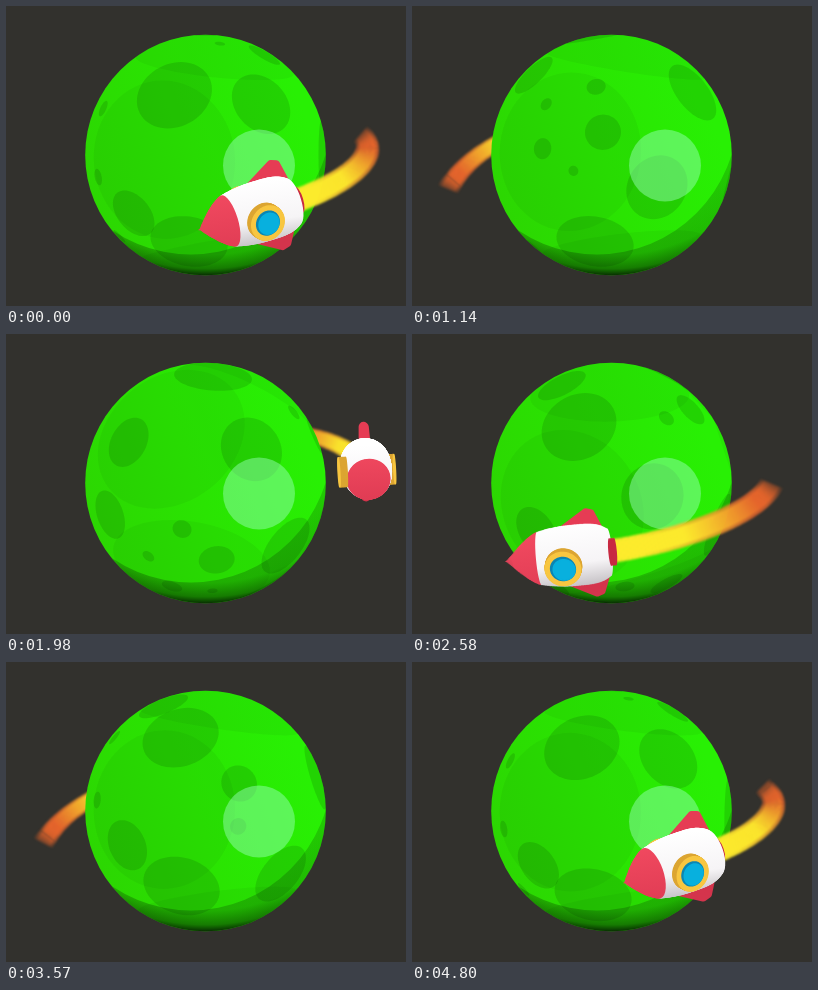
These frames come from a looping animation (400x300 px, 4830 ms). An HTML page with a canvas:

```html
<!DOCTYPE html>
<html>
<head>
<meta charset="utf-8">
<title>Rocket in orbit</title>
<style>
html, body { margin: 0; width: 100%; height: 100%; overflow: hidden; background: #32312d; }
canvas { display: block; width: 400px; height: 300px; }
</style>
</head>
<body>
<canvas id="stage" width="400" height="300"></canvas>
<script>
const LOOP = 4830, STEP = 30, ORBIT = LOOP / 2, TAU = Math.PI * 2, DEG = Math.PI / 180;
const { sin, cos, sqrt, abs, hypot, min, max, atan2 } = Math;
const ctx = document.getElementById('stage').getContext('2d');
const layer = document.createElement('canvas');
layer.width = 400;
layer.height = 300;
const trailCtx = layer.getContext('2d');

// ---------- planet ----------
const PX = 199.5, PY = 149, PR = 120.3;
// The spin axis points right and towards the viewer.
const AX = 0.8, AZ = 0.6;

// A belt of evenly spaced spots: height on the axis, longitude in degrees, radius.
const belt = (n, h, lon, gap, radius) =>
  Array.from({ length: n }, (_, i) => [h, lon + gap * i, radius]);

const plains = belt(4, 0.17, 3, 90, 0.72);
const craters = [
  ...belt(3, 0.265, -33, 85, 0.33),
  ...belt(3, -0.12, 30, 81, 0.22),
  ...belt(4, -0.47, -26, 38, 0.07),
  ...belt(2, 0.84, -54, 234, 0.28),
  // the scattered small ones
  [-0.335, -131, 0.21], [0.53, -98, 0.15], [0.785, 72, 0.155], [0.385, -123, 0.08],
  [0, -110, 0.055], [0.03, -88, 0.088], [0.31, -77, 0.043], [0.79, 106, 0.07]
];

function disc(x, y, r) {
  ctx.beginPath();
  ctx.arc(x, y, r, 0, TAU);
}

// A round patch on the sphere, pushed to the rim where it turns away.
function patch([h, lon, radius], turn) {
  const a = lon * DEG + turn, r = sqrt(1 - h * h);
  const x = AX * h - AZ * r * cos(a), y = r * sin(a), z = AZ * h + AX * r * cos(a);
  if (z < -sin(radius)) return;
  const m = hypot(x, z) || 1;
  const e = [z / m, 0, -x / m];
  const f = [y * e[2], z * e[0] - x * e[2], -y * e[0]];
  const k = cos(radius), s = sin(radius);
  ctx.beginPath();
  for (let i = 0; i < 64; i++) {
    const c = s * cos(i / 64 * TAU), d = s * sin(i / 64 * TAU);
    let qx = x * k + e[0] * c + f[0] * d;
    let qy = y * k + f[1] * d;
    const qz = z * k + e[2] * c + f[2] * d;
    if (qz < 0) {
      const n = hypot(qx, qy);
      qx /= n;
      qy /= n;
    }
    ctx.lineTo(PX + PR * qx, PY + PR * qy);
  }
  ctx.fill();
}

function drawPlanet(turn) {
  ctx.save();
  disc(PX, PY, PR);
  const base = ctx.createLinearGradient(80, 190, 300, 110);
  base.addColorStop(0, '#2cd602');
  base.addColorStop(0.5, '#2ae402');
  base.addColorStop(1, '#28f004');
  ctx.fillStyle = base;
  ctx.fill();
  ctx.clip();

  ctx.fillStyle = 'rgba(0,70,0,.06)';
  plains.forEach(p => patch(p, turn));
  ctx.fillStyle = 'rgba(0,50,0,.15)';
  craters.forEach(c => patch(c, turn));

  // shaded crescent along the bottom right
  ctx.beginPath();
  ctx.rect(0, 0, 400, 300);
  ctx.arc(185, 108, 140.5, 0, TAU, true);
  const shade = ctx.createRadialGradient(199, 60, 150, 199, 60, 210);
  shade.addColorStop(0, 'rgba(0,20,0,.17)');
  shade.addColorStop(0.65, 'rgba(0,20,0,.22)');
  shade.addColorStop(0.88, 'rgba(0,15,0,.46)');
  shade.addColorStop(1, 'rgba(0,8,0,.85)');
  ctx.fillStyle = shade;
  ctx.fill('evenodd');

  disc(253, 159.5, 36);
  ctx.fillStyle = 'rgba(155,255,190,.46)';
  ctx.fill();
  ctx.restore();
}

// ---------- orbit ----------
const OX = 198, OY = 151;
const place = a => {
  const s = sin(a), c = cos(a), near = 1 / (1 - 0.3 * s);
  const lift = s < 0 ? 66 : 46.5;
  return { x: OX + 156 * c * near, y: OY + (lift * s - 23.4 * c) * near, near };
};

// ---------- flame ----------
// Yellow at the nozzle, cooling to red-orange, thin at the very end.
function flameColor(p) {
  const heat = 1 - min(1, max(0, (p - 0.3) / 0.45));
  const end = min(1, (1.04 - p) / 0.2);
  return `rgba(${240 + 15 * heat},${105 + 130 * heat},45,${max(0, end) * (0.82 + 0.18 * heat)})`;
}

function drawTrail(head, front) {
  const N = 70, from = 13 * DEG, span = 64 * DEG;
  trailCtx.clearRect(0, 0, 400, 300);
  const edge = (i, size) => {
    const a = head - from - span * i / N;
    const p = place(a), q = place(a - 0.01);
    const dx = q.x - p.x, dy = q.y - p.y, n = hypot(dx, dy) || 1;
    const w = size * min(1.2, p.near ** 1.5);
    return [p.x - dy / n * w, p.y + dx / n * w, p.x + dy / n * w, p.y - dx / n * w];
  };
  // a cooler mantle, then the hot core
  for (const [size, cool] of [[9.8, 0.22], [7.2, 0]]) {
    for (let i = 0; i < N; i++) {
      const mid = (i + 0.5) / N;
      if ((sin(head - from - span * mid) >= 0) !== front) continue;
      const e = edge(i, size), f = edge(i + 1, size);
      trailCtx.fillStyle = flameColor(mid + cool * (1 - mid));
      trailCtx.beginPath();
      trailCtx.moveTo(e[0], e[1]);
      trailCtx.lineTo(e[2], e[3]);
      trailCtx.lineTo(f[2], f[3]);
      trailCtx.lineTo(f[0], f[1]);
      trailCtx.fill();
    }
  }
  ctx.save();
  ctx.filter = 'blur(1.2px)';
  ctx.drawImage(layer, 0, 0);
  ctx.restore();
}

// ---------- rocket ----------
const SP = 0.37, CP = 0.93, TAIL = -47, NOSE = 58;
const view = (x, y, z) => [x, z * SP - y * CP, z * CP + y * SP];

function hullRadius(u) {
  if (u < TAIL) return 14;
  if (u > 24) return 27 * (1 - ((u - 24) / (NOSE - 24)) ** 1.35);
  return u > -10 ? 31 - 4 * ((u + 10) / 34) ** 2 : 31 - 7 * ((u + 10) / 37) ** 4;
}

function drawRocket(head) {
  const p = place(head);
  const yaw = head - (7 + (p.x - OX) * 0.06) * DEG;
  const dx = -sin(yaw), dz = cos(yaw);
  // along the hull, up, and out of the side
  const at = (u, v, w) => view(dx * u - dz * w, v, dz * u + dx * w);
  const nose = at(1, 0, 0);
  const scale = 0.77 + 0.23 * sin(head);

  ctx.save();
  ctx.translate(p.x, p.y);
  ctx.rotate(-8.4 * DEG * max(0, sin(head)));
  ctx.scale(scale, scale);
  ctx.lineJoin = 'round';

  const white = ctx.createLinearGradient(0, -32, 0, 34);
  white.addColorStop(0, '#ffffff');
  white.addColorStop(0.62, '#f6f4f6');
  white.addColorStop(1, '#c2bec2');
  const red = ctx.createLinearGradient(0, -28, 0, 34);
  red.addColorStop(0, '#f24a60');
  red.addColorStop(1, '#e03c54');

  const fin = (side, height) => {
    ctx.beginPath();
    for (const [u, v] of [[2, 27], [-29, height], [-35, height - 2], [-42, 25]]) {
      const q = at(u, v * side, 0);
      ctx.lineTo(q[0], q[1]);
    }
    ctx.closePath();
    ctx.fillStyle = ctx.strokeStyle = side > 0 ? '#e63c54' : '#d4344c';
    ctx.lineWidth = 4 + 8 * abs(dz);
    ctx.fill();
    ctx.stroke();
  };
  const fins = () => {
    fin(-1, 44);
    fin(1, 47);
  };

  const ring = (r, out, color, shift = 0) => {
    ctx.beginPath();
    for (let i = 0; i < 40; i++) {
      const a = i / 40 * TAU;
      const q = at(r * cos(a) - 3 - shift, r * sin(a) - shift, out);
      ctx.lineTo(q[0], q[1]);
    }
    ctx.closePath();
    ctx.fillStyle = ctx.strokeStyle = color;
    ctx.lineWidth = 1.5;
    ctx.fill();
    ctx.stroke();
  };

  const porthole = side => {
    for (let w = 25; w < 34; w++) ring(18, w * side, '#dca532');
    ring(18, 34 * side, '#f8c640');
    if (at(0, 0, side)[2] > 0.15) {
      ring(12.5, 34 * side, '#0a86b4');
      ring(11, 34 * side, '#08b0de', 1);
    }
  };

  const hull = () => {
    const flip = nose[2] < 0, turn = atan2(nose[1], nose[0]), count = NOSE - TAIL + 6;
    for (let i = 0; i <= count; i++) {
      const u = flip ? NOSE - i : NOSE - count + i;
      const r = max(0.5, hullRadius(u)), q = at(u, 0, 0);
      ctx.beginPath();
      ctx.ellipse(q[0], q[1], max(0.8, r * abs(nose[2])), r, turn, 0, TAU);
      ctx.fillStyle = u < TAIL ? '#c82a42' : u > 24 ? red : white;
      ctx.fill();
    }
  };

  const near = at(0, 0, 1)[2] > 0 ? 1 : -1;
  const away = nose[2] < -0.4;
  porthole(-near);
  if (!away) fins();
  hull();
  if (away) fins();
  porthole(near);
  ctx.restore();
}

// ---------- frame ----------
function draw(t) {
  const head = 77.7 * DEG + t / ORBIT * TAU;
  const front = sin(head) >= 0;
  const leaving = cos(head) < -0.3;

  ctx.fillStyle = '#32312d';
  ctx.fillRect(0, 0, 400, 300);

  // The flame lies over the hull while the rocket flies away.
  const pass = side => {
    if (!leaving) drawTrail(head, side);
    if (front === side) drawRocket(head);
    if (leaving) drawTrail(head, side);
  };
  pass(false);
  drawPlanet(t / LOOP * TAU);
  pass(true);
}

const start = performance.now();
function tick() {
  const t = (performance.now() - start) % LOOP;
  draw(Math.floor(t / STEP) * STEP);
  requestAnimationFrame(tick);
}
tick();
</script>
</body>
</html>
```
